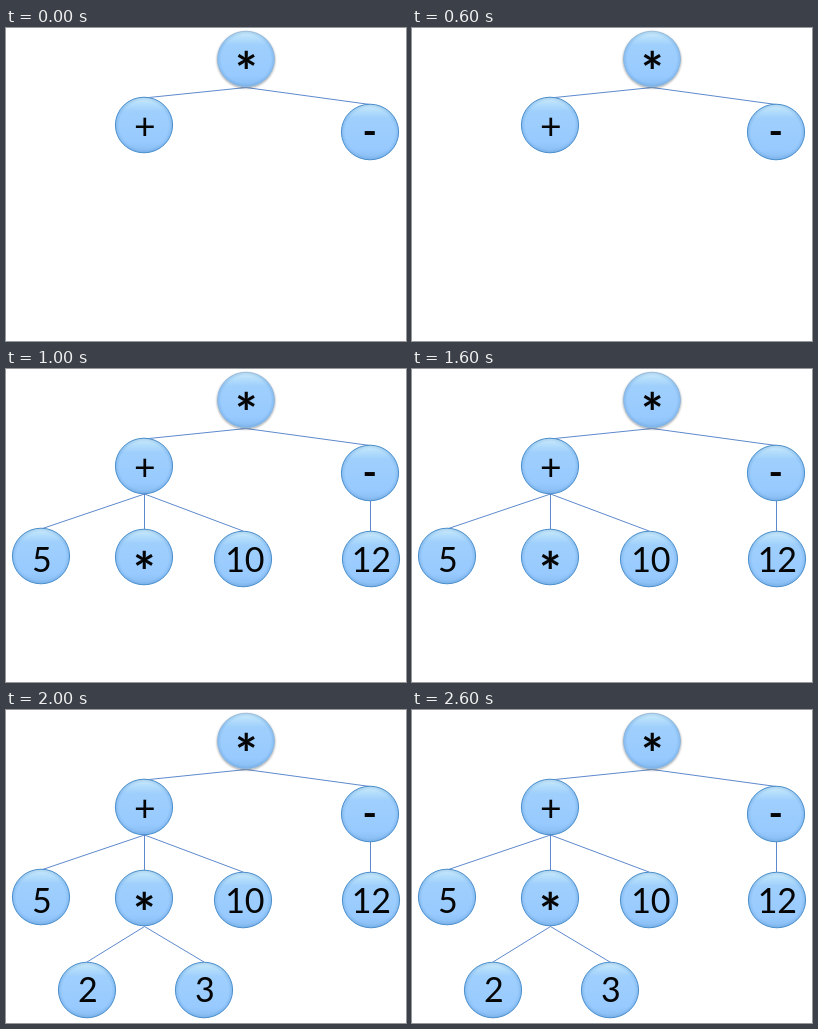
Animation of 400x313 px, one loop 3000 ms. Source, as an HTML page:

```html
<!DOCTYPE html>
<html lang="en">
<head>
<meta charset="utf-8">
<title>Expression tree</title>
<style>
html, body { margin: 0; width: 100%; height: 100%; overflow: hidden; background: #fff; }
svg { display: block; width: 100%; height: 100%; }
text { font-family: Lato, Inter, sans-serif; fill: #050505; }
</style>
</head>
<body>
<svg id="stage" viewBox="0 0 400 313">
  <defs>
    <linearGradient id="face" x1="0" y1="0" x2="0" y2="1">
      <stop offset="0" stop-color="#d3eefb"/>
      <stop offset=".1" stop-color="#b8e0fb"/>
      <stop offset=".25" stop-color="#9fcffc"/>
      <stop offset=".8" stop-color="#98caff"/>
      <stop offset="1" stop-color="#88bdf2"/>
    </linearGradient>
    <radialGradient id="rim">
      <stop offset=".86" stop-color="#4f8fcc" stop-opacity="0"/>
      <stop offset="1" stop-color="#4f8fcc" stop-opacity=".3"/>
    </radialGradient>
    <filter id="shadow" x="-20%" y="-20%" width="140%" height="140%">
      <feDropShadow dx="0" dy="1" stdDeviation="1" flood-color="#000" flood-opacity=".4"/>
    </filter>
  </defs>
</svg>
<script>
(() => {
  const NS = 'http://www.w3.org/2000/svg';
  const STEP = 1000;
  const DIGIT_SIZE = 34;
  const stage = document.getElementById('stage');
  const pen = document.createElement('canvas').getContext('2d');

  function add(parent, tag, attrs) {
    const el = document.createElementNS(NS, tag);
    for (const key in attrs) el.setAttribute(key, attrs[key]);
    return parent.appendChild(el);
  }

  function measure(str, size, weight) {
    pen.font = `${weight} ${size}px Lato, Inter, sans-serif`;
    const m = pen.measureText(str);
    return {
      left: -m.actualBoundingBoxLeft,
      top: -m.actualBoundingBoxAscent,
      w: m.actualBoundingBoxLeft + m.actualBoundingBoxRight,
      h: m.actualBoundingBoxAscent + m.actualBoundingBoxDescent
    };
  }

  // Centres the visible ink of a label on a point.
  function label(parent, str, x, y, size = DIGIT_SIZE, weight = 400) {
    const ink = measure(str, size, weight);
    add(parent, 'text', {
      x: x - ink.left - ink.w / 2,
      y: y - ink.top - ink.h / 2,
      'font-size': size,
      'font-weight': weight
    }).textContent = str;
  }

  // Operators get their font size from the wanted extent of their ink.
  function operator(parent, str, x, y, extent, weight) {
    const probe = measure(str, 100, weight);
    label(parent, str, x, y, 100 * extent / Math.max(probe.w, probe.h), weight);
  }

  function link(parent, x1, y1, x2, y2) {
    add(parent, 'line', { x1, y1, x2, y2, stroke: '#4c7cc8', 'stroke-width': 0.9 });
  }

  function disc(parent, cx, cy, root) {
    const shape = { cx, cy, rx: 28.6, ry: 27.8 };
    add(parent, 'ellipse', {
      ...shape,
      fill: 'url(#face)',
      stroke: root ? '#9dbbd6' : '#4a8fcc',
      'stroke-width': root ? 0.8 : 1,
      ...(root && { filter: 'url(#shadow)' })
    });
    add(parent, 'ellipse', { ...shape, fill: 'url(#rim)' });
  }

  const levels = [0, 1, 2].map(() => add(stage, 'g', {}));
  const [upper, middle, lower] = levels;

  link(upper, 240, 59.5, 138, 70);
  link(upper, 240, 59.5, 364, 76.5);
  disc(upper, 240, 31, true);
  disc(upper, 138, 97);
  disc(upper, 364, 104);
  operator(upper, '*', 240, 31, 18, 700);
  operator(upper, '+', 138.5, 98, 19, 400);
  operator(upper, '-', 364, 104.5, 10.5, 700);

  for (const [x, y] of [[35, 160], [138.5, 160], [237, 162]]) link(middle, 138.5, 125, x, y);
  link(middle, 364.5, 132, 364.5, 162);
  for (const [x, y] of [[35, 187], [138, 188], [237, 190], [365, 190]]) disc(middle, x, y);
  label(middle, '5', 35.5, 190);
  operator(middle, '*', 138, 190.5, 18, 700);
  label(middle, '10', 239.5, 190);
  label(middle, '12', 365.5, 190);

  for (const [x, digit] of [[81, '2'], [198, '3']]) {
    link(lower, 138.5, 216.5, x, 252);
    disc(lower, x, 280);
    label(lower, digit, x + 0.5, 279.5);
  }

  function render(ms) {
    const step = Math.floor(ms / STEP) % levels.length;
    levels.forEach((g, i) => g.setAttribute('visibility', step >= i ? 'visible' : 'hidden'));
  }

  const start = performance.now();
  function tick() {
    render(performance.now() - start);
    requestAnimationFrame(tick);
  }
  tick();
})();
</script>
</body>
</html>
```
